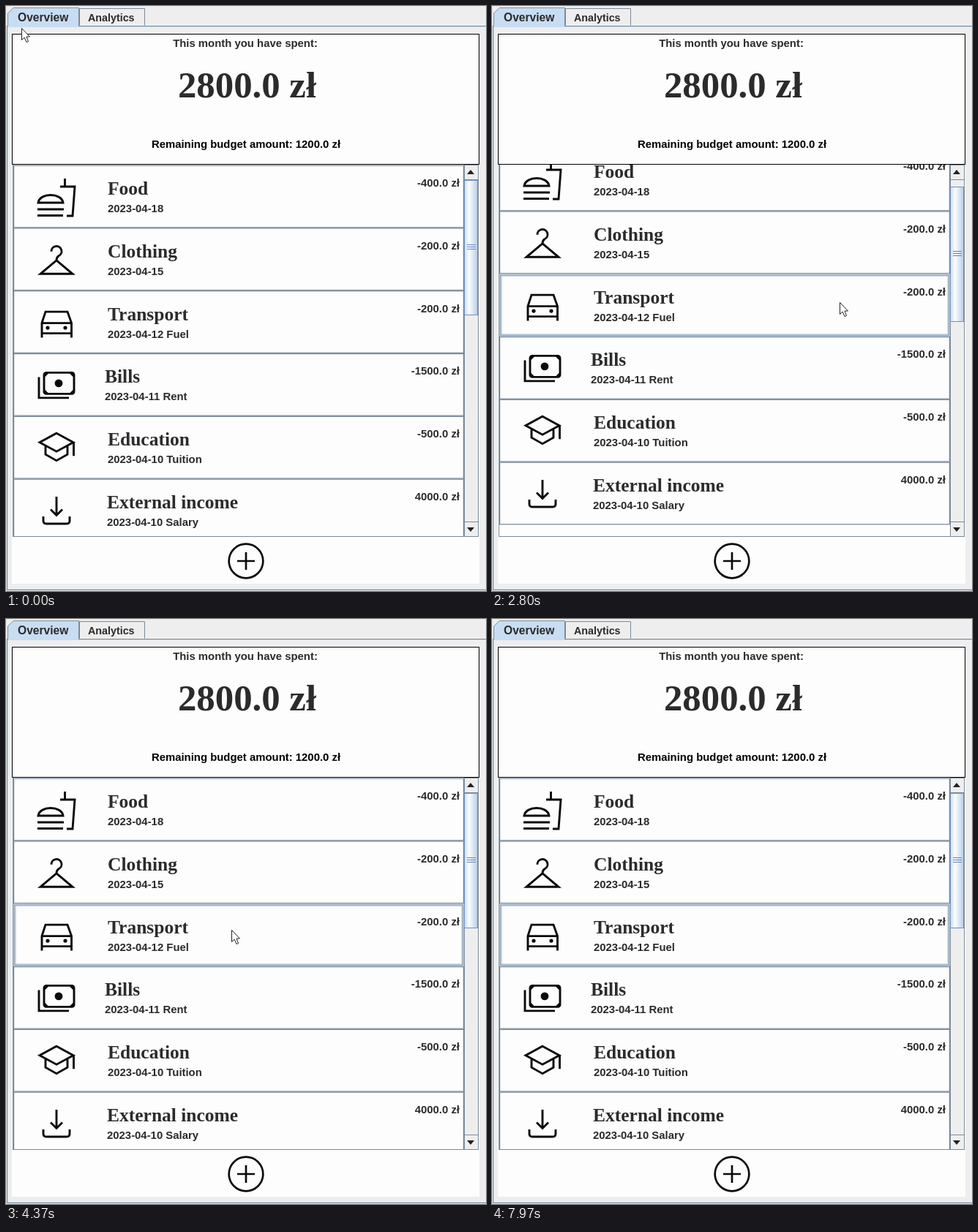
These frames come from a looping animation (656 px wide and 800 px high, 8 s). An HTML page:

```html
<!DOCTYPE html>
<html lang="en">
<head>
<meta charset="utf-8">
<title>Budget overview</title>
<style>
  html, body { margin: 0; width: 100%; height: 100%; overflow: hidden; background: #eee; }
  svg { display: block; width: 656px; height: 800px; }
  text { font: bold 14.9px "Liberation Sans", Arial, sans-serif; fill: #2b2b2b; }
  .title { font: bold 25.5px "Liberation Serif", Times, serif; }
  .total { font: bold 50.8px "Liberation Serif", Times, serif; }
  .mid { text-anchor: middle; }
  .end { text-anchor: end; }
  .crisp { shape-rendering: crispEdges; }
  .edge { fill: none; stroke: #7a8a99; }
  .row { fill: #fdfdfd; stroke-width: 1.24; }
  .glow { fill: none; stroke: #b8cfe5; stroke-width: 1.24; }
  .icon { fill: none; stroke: #0a0a0a; stroke-width: 2.9; }
  .icon .solid { fill: #0a0a0a; stroke: none; }
</style>
</head>
<body>
<svg viewBox="0 0 656 800">
  <defs>
    <clipPath id="view"><rect x="9" y="217" width="617" height="508"/></clipPath>
    <linearGradient id="shine">
      <stop offset="0" stop-color="#c8ddf2"/>
      <stop offset=".35" stop-color="#fbfdff"/>
      <stop offset="1" stop-color="#b8cfe5"/>
    </linearGradient>
  </defs>

  <rect width="656" height="800" fill="#eee"/>
  <path class="crisp" d="M2 28.5H655M2.5 28V798M2 797.5H655" stroke="#c8ddf2"/>
  <path class="edge" d="M100.5 26.5V3.5H189.5V26.5"/>
  <path d="M2.5 28V10L10 2.5H99.5V28" fill="#c8ddf2" stroke="#7a8a99"/>
  <path class="edge crisp" d="M100 27.5H656M1.5 27V798.5H656"/>
  <text x="16" y="20.5" style="font-size:15.6px">Overview</text>
  <text x="112" y="20.5" style="font-size:14.3px">Analytics</text>

  <rect x="8" y="38" width="639" height="752" fill="#fdfdfd"/>
  <g clip-path="url(#view)"><g id="rows"></g></g>
  <path class="edge crisp" d="M9.5 217V725.5H646"/>
  <rect class="crisp" x="8.5" y="38.5" width="638" height="178" fill="#fdfdfd" stroke="#000"/>
  <text class="mid" x="327" y="56">This month you have spent:</text>
  <text class="mid total" x="329.5" y="125">2800.0 zł</text>
  <text class="mid" x="328" y="194" style="fill:#000">Remaining budget amount: 1200.0 zł</text>

  <g class="crisp">
    <rect x="626.5" y="217.5" width="19" height="508" fill="#eee" stroke="#7a8a99"/>
    <path class="edge" d="M626 237.5H646M626 705.5H646"/>
    <g id="thumb">
      <rect x="626.5" y="238.5" width="18" height="184" fill="url(#shine)" stroke="#6f8fc0"/>
      <path d="M630 326.5H642M630 329.5H642M630 332.5H642" stroke="#6382bf"/>
    </g>
  </g>
  <path d="M630 230L635 224L640 230ZM630 713H640L635 719Z" fill="#222"/>

  <g fill="none" stroke="#0a0a0a" stroke-width="2.7">
    <circle cx="328" cy="759" r="23.3"/>
    <path d="M316 759H340M328 747V771"/>
  </g>
  <path id="cursor" d="M.5 .5V16.5L4 13L7 19.5L9.5 18.5L7 12H11.5Z" fill="#fff" stroke="#222"/>
</svg>
<script>
const LOOP = 8000, TOP = 218, PITCH = 85.8, WHEEL = 11.5 / 3;
const byId = id => document.getElementById(id);
const dot = (x, y, r) => `<circle class="solid" cx="${x}" cy="${y}" r="${r}"/>`;
const path = (d, type = "") => `<path class="${type}" d="${d}"/>`;

// Rectangle drawn n border widths inside a row's outline
const inset = (n, type) => {
  const d = n * 1.24;
  return `<rect class="${type}" x="${10.6 + d}" y="${.2 + d}" width="${614.8 - 2 * d}" height="${84.6 - 2 * d}"/>`;
};

// title, detail, amount, text x, icon
const entries = [
  ["Food", "2023-04-18", "-400.0", 139,
    path("M80.5 18V29M74 29H94L91 69H83M44 51C46 37 76 37 78 51ZM43 60H79M43 68.5H78")],
  ["Clothing", "2023-04-15", "-200.0", 139,
    path("M62 32A7 7 0 1 1 72 38Q69 40 69 44L47 62.5H91L69 44")],
  ["Transport", "2023-04-12 Fuel", "-200.0", 139,
    path("M49 64V44L54 28.5H84L89.5 44V64M49 44H89M49 58H89") + dot(57, 50.5, 2.6) + dot(81, 50.5, 2.6)],
  ["Bills", "2023-04-11 Rent", "-1500.0", 135,
    `<rect x="52" y="26" width="41" height="29" rx="3"/>` + path("M45 32V60.5H86") +
    path("M52 33V26H59ZM86 26H93V33ZM52 48V55H59ZM93 48V55H86Z", "solid") + dot(72, 40.5, 5.4)],
  ["Education", "2023-04-10 Tuition", "-500.0", 139,
    path("M69 23L92 35.5L69 48L46 35.5ZM54 41V52L69 60.5L84 52V41M92.5 35V54")],
  ["External income", "2023-04-10 Salary", "4000.0", 138,
    path("M69 24V49M61 41.5L69 49.5L77 41.5M51 51V57Q51 61 55 61H83Q87 61 87 57V51")]
];

byId("rows").innerHTML = entries.map(([title, detail, amount, x, icon], i) =>
  `<g transform="translate(0 ${TOP + i * PITCH})">
    <g class="plain">${inset(0, "edge row")}</g>
    <g class="hover">${inset(0, "glow") + inset(1, "edge row") + inset(2, "glow")}</g>
    <g class="icon">${icon}</g>
    <text class="title" x="${x}" y="40">${title}</text>
    <text x="${x}" y="64">${detail}</text>
    <text class="end" x="620" y="29">${amount} zł</text></g>`).join("");
const rows = [...byId("rows").children];

// time, x, y
const pointer = [[0, 21, 30], [1200, 509, 424], [1570, 509, 424], [2000, 475, 405],
  [3500, 475, 405], [4370, 309, 425], [4870, -16, 432]];
// time, offset
const scrolling = [[0, 0], [1600, 0], [2250, 30.7], [2500, 30.7], [2800, 23], [3200, 11.5], [3600, 0]];

function at(keys, t) {
  const next = keys.findIndex(k => k[0] > t);
  if (next < 0) return keys[keys.length - 1].slice(1);
  const a = keys[next - 1], b = keys[next], p = (t - a[0]) / (b[0] - a[0]);
  return a.slice(1).map((v, i) => v + (b[i + 1] - v) * p);
}

function draw(t) {
  const [x, y] = at(pointer, t).map(Math.round);
  const scroll = Math.round(at(scrolling, t)[0] / WHEEL) * WHEEL;
  byId("cursor").setAttribute("transform", `translate(${x} ${y})`);
  byId("rows").setAttribute("transform", `translate(0 ${-scroll})`);
  byId("thumb").setAttribute("transform", `translate(0 ${Math.round(scroll * .38)})`);
  const active = y < TOP ? -1 : Math.floor((y - TOP + scroll) / PITCH);
  rows.forEach((row, i) => {
    row.querySelector(".plain").style.display = i === active ? "none" : "";
    row.querySelector(".hover").style.display = i === active ? "" : "none";
  });
}

const start = performance.now();
function tick() {
  draw((performance.now() - start) % LOOP);
  requestAnimationFrame(tick);
}
tick();
</script>
</body>
</html>
```
